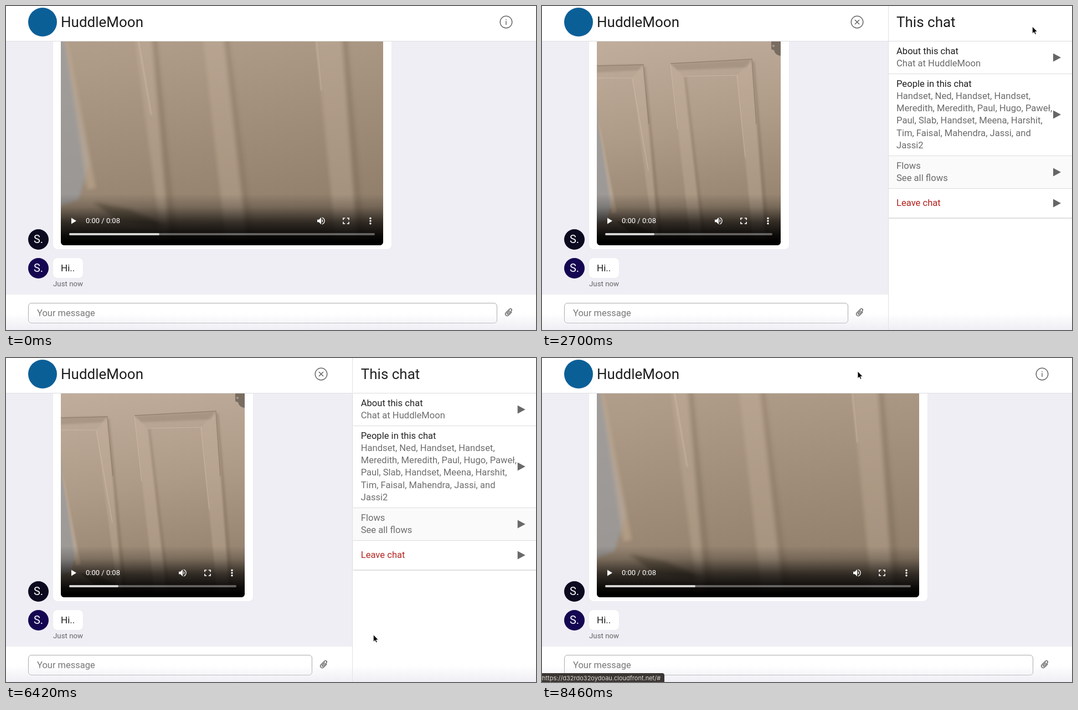
These frames come from a looping animation (957x585 px, 8520 ms). An HTML page:

```html
<!DOCTYPE html>
<html lang="en">
<head>
<meta charset="utf-8">
<title>Chat</title>
<style>
html, body { margin: 0; width: 100%; height: 100%; overflow: hidden; background: #fff; }
body { font: 16.6px/22.2px Roboto, sans-serif; color: #1d1d1d; }
div, svg { position: absolute; top: 0; box-sizing: border-box; white-space: nowrap; }
#stage { left: 0; width: 957px; height: 585px; overflow: hidden; }
#chat { --w: 957px; --video: 582px; --edge: 54px; left: 0; width: var(--w); height: 585px; background: #efeef5; overflow: hidden; }
#chat.narrow { --w: 625px; --video: 331.5px; --edge: 56px; }
.icon { width: 1px; height: 1px; overflow: visible; fill: none; stroke: #555; stroke-width: 1.3; }
.head { left: 0; right: 0; height: 64px; background: #fff; border-bottom: 1px solid #dedee2; }
.title { font-size: 26px; line-height: 30px; top: 14px; }
.logo { left: 40px; top: 3px; width: 52px; height: 52px; border-radius: 50%; background: #0b5f97; }
.bubble { left: 85px; background: #fff; border-radius: 7px; box-shadow: 0 0 1px #0002; }
.avatar { left: 40px; width: 37px; height: 37px; border-radius: 50%; color: #fff; font-size: 20px; line-height: 37px; text-align: center; }
#video { left: 99px; top: 63px; width: var(--video); height: 369px; border-radius: 0 0 6px 6px; overflow: hidden; }
#video .icon { stroke: #fff; fill: #fff; top: 325px; }
#door { left: 0; width: 100%; height: 369px; }
.shade { left: 0; right: 0; top: 277px; height: 92px; background: linear-gradient(#0000, #0003 25%, #000a 55%, #000000ec 82%, #000 95%); }
.track { left: 15px; right: 15px; top: 347px; height: 4px; border-radius: 2px; background: #ffffff59; }
.track div { left: 0; width: 29.6%; height: 4px; border-radius: 2px; background: #ffffffb8; }
.foot { left: 0; right: 0; top: 521px; height: 64px; background: #fff; }
.field { left: 40px; right: calc(var(--edge) + 16px); top: 15px; height: 37px; border: 1px solid #a9a9ad; border-radius: 6px; padding-left: 15px; line-height: 35px; font-size: 16.5px; color: #757575; }
#panel { left: 625px; width: 332px; height: 585px; background: #fff; border-left: 1px solid #e0e0e2; overflow: hidden; }
.page { left: 0; width: 331px; height: 585px; }
.page .title { left: 14px; }
.rows { left: 0; top: 64px; width: 331px; box-shadow: 0 1px 2px #0002; }
.row { position: relative; padding: 6.8px 14px; border-bottom: 1px solid #dcdcdc; }
.row span, .row.off { color: #6b6b6b; }
.row.off { background: #fafafa; }
.row.leave { padding: 15px 14px; color: #b3201b; }
.row .icon { left: 297px; top: 50%; fill: #666; stroke: none; }
.back { left: 29px; top: 550px; color: #666; }
.fade { left: 0; right: 0; top: 555px; height: 30px; background: linear-gradient(#e4e4ee00, #e4e4eea0); }
#status { left: 0; top: 569px; width: 221px; height: 16px; background: #3b3633; border-radius: 0 4px 0 0; color: #dedad6; font: 11px/18px Inter, sans-serif; }
#cursor { left: 0; }
</style>
</head>
<body>
<div id="stage">
  <div id="chat">
    <div class="bubble" style="top:30px;height:409px;width:calc(var(--video) + 29px)"></div>
    <div id="video">
      <svg id="door" viewBox="0 0 331.5 369" preserveAspectRatio="xMidYMax slice">
        <defs>
          <linearGradient id="wall" x2=".15" y2="1">
            <stop stop-color="#c0ad9c"/><stop offset=".5" stop-color="#ae9b87"/><stop offset="1" stop-color="#917f6b"/>
          </linearGradient>
          <filter id="soft" x="-20%" width="140%"><feGaussianBlur stdDeviation="1.8"/></filter>
          <filter id="fine"><feGaussianBlur stdDeviation=".6"/></filter>
        </defs>
        <path fill="url(#wall)" d="M0 0H332V369H0Z"/>
        <g filter="url(#soft)">
          <path fill="#9b9da1" opacity=".75" d="M-3 90L4 159L30 285L18 322L-3 330Z"/>
          <path fill="#c5ad94" opacity=".5" d="M1 140L7 159L36 310L27 312Z"/>
          <path fill="#705f4e" opacity=".28" d="M84 45L88 48L120 369H111ZM280 36L285 38L313 369H304Z"/>
          <path fill="#c8b5a2" opacity=".35" d="M64 67L84 43L112 369H104ZM133 42L157 64L192 369H170ZM253 62L280 34L305 369H283Z"/>
          <path fill="#6f5f4e" opacity=".22" d="M157 64L162 66L199 369H191ZM0 45L84 43L76 53L0 57ZM133 42L280 34L270 48L145 53Z"/>
          <path fill="#413529" opacity=".4" d="M34 325L70 332L110 350L60 345Z"/>
        </g>
        <g fill="none" filter="url(#fine)">
          <path stroke="#dccabb" stroke-width="1.1" opacity=".5" d="M0 67L64 67L93 235M157 64L253 62L268 210M133 42L146 159"/>
          <path stroke="#756553" stroke-width="1.3" opacity=".5" d="M0 45L84 43L94 150M133 41L280 33L288 150"/>
        </g>
        <path fill="#796d61" d="M315 0H332V27Q322 26 320 17L315 15Z"/>
        <circle cx="319" cy="9" r="2" fill="#a79b8d"/>
      </svg>
      <div class="shade"></div>
      <svg class="icon" style="left:19px"><path stroke="none" d="M0-5.5L9 0L0 5.5Z"/></svg>
      <div style="left:45px;top:314px;font-size:13px;color:#fff">0:00 / 0:08</div>
      <svg class="icon" style="right:111px"><path stroke="none" d="M-7-2.3V2.3H-4L0 6.2V-6.2L-4-2.3ZM1.5-3.4Q5 0 1.5 3.4Z"/><path fill="none" d="M1.6-5.8A6 6 0 0 1 1.6 5.8"/></svg>
      <svg class="icon" style="right:66px"><path fill="none" stroke-width="1.7" d="M-5-1.8V-5H-1.8M1.8-5H5V-1.8M5 1.8V5H1.8M-1.8 5H-5V1.8"/></svg>
      <svg class="icon" style="right:22px;stroke:none"><circle cy="-4.8" r="1.7"/><circle r="1.7"/><circle cy="4.8" r="1.7"/></svg>
      <div class="track"><div></div></div>
    </div>
    <div class="avatar" style="top:402.5px;background:#0b0a1f">S.</div>
    <div class="avatar" style="top:454.5px;background:#150651">S.</div>
    <div class="bubble" style="top:455px;width:54px;height:36px;padding-left:14px;line-height:36px;font-size:17px">Hi..</div>
    <div style="left:85px;top:490.5px;font-size:13.3px;color:#666">Just now</div>
    <div class="head">
      <div class="logo"></div>
      <div class="title" style="left:99px">HuddleMoon</div>
      <svg class="icon" style="right:calc(var(--edge) - 1px);top:29px">
        <circle r="10.8"/>
        <path id="info" d="M0-2V5M0-5.2V-3.7"/>
        <path id="close" d="M-4-4L4 4M4-4L-4 4"/>
      </svg>
    </div>
    <div class="foot">
      <div class="field">Your message</div>
      <svg class="icon" style="right:calc(var(--edge) - 6px);top:32px"><path transform="rotate(45)" d="M3.4-4V4.3A3.3 3.3 0 0 1-3.2 4.3V-5A2.3 2.3 0 0 1 1.4-5V3.4A1 1 0 0 1-1 3.4V-3.5"/></svg>
    </div>
  </div>
  <div id="panel">
    <div class="page" id="menu">
      <div class="head"><div class="title">This chat</div></div>
      <div class="rows">
        <div class="row">About this chat<br><span>Chat at HuddleMoon</span></div>
        <div class="row">People in this chat<br><span>Handset, Ned, Handset, Handset,<br>Meredith, Meredith, Paul, Hugo, Paweł,<br>Paul, Slab, Handset, Meena, Harshit,<br>Tim, Faisal, Mahendra, Jassi, and<br>Jassi2</span></div>
        <div class="row off">Flows<br>See all flows</div>
        <div class="row leave">Leave chat</div>
      </div>
    </div>
    <div class="page" id="details">
      <div class="head"><div class="title">Chat info</div></div>
      <div class="rows">
        <div class="row">2<br><span>ID</span></div>
        <div class="row">HuddleMoon<br><span>Company name</span></div>
        <div class="row">2021-06-14T08:55:44.000000Z<br><span>Created at</span></div>
      </div>
      <svg class="icon" style="left:16px;top:562px;stroke-width:1.8"><path d="M4-6.5L-1.5 0L4 6.5"/></svg>
      <div class="back">Back</div>
    </div>
  </div>
  <div class="fade"></div>
  <div id="status">https://d32rdo32oydoau.cloudfront.net/#</div>
  <svg id="cursor" class="icon">
    <path id="arrow" transform="scale(.88)" fill="#000" stroke="#fff" stroke-width="1" d="M0 0V14.8L3.4 11.6L5.6 16.4L8 15.3L5.9 10.7H10.4Z"/>
    <g id="hand" stroke="#111" stroke-width="1.1">
      <path fill="#fff" d="M-1.3 1.3a1.3 1.3 0 0 1 2.6 0V6c0-1.6 2.3-1.6 2.5 0c.3-1.2 2.2-1 2.3.4c.5-.9 1.9-.5 1.9.7V10.5c0 2-1.3 2.5-1.3 5H-.3C-.6 13-5.5 9.8-5.5 8.3c0-1.5 2-1.3 4.2 1.2Z"/>
      <path d="M1 10V13.5M3 10V13.5M5 10V13.5" stroke-width=".8"/>
    </g>
  </svg>
</div>
<script>
const LOOP = 8520;
const $ = id => document.getElementById(id);
const show = (id, on) => $(id).style.display = on ? '' : 'none';

document.querySelectorAll('#menu .row').forEach(row =>
  row.insertAdjacentHTML('beforeend', '<svg class="icon"><path d="M0-7.5L14 0L0 7.5Z"/></svg>'));

// [time, page shown in the side panel]
const pages = [[0, ''], [1968, 'menu'], [3460, 'details'], [6100, 'menu'], [8160, '']];

// [time, x, y] of the pointer tip
const path = [
  [0, 975, 340], [240, 975, 340], [600, 850, 190], [840, 850, 190], [1560, 897, 31.5],
  [2580, 897, 31.5], [3300, 742, 104], [4380, 742, 104], [4980, 803, 260], [5160, 803, 260],
  [5340, 663, 495], [5700, 667, 558], [6240, 667, 558], [6840, 650, 290], [7200, 596, 106],
  [7320, 596, 106], [7800, 570, 24], [LOOP, 570, 24]
];

function pointer(t) {
  const i = path.findIndex(p => p[0] > t);
  const [t0, x0, y0] = path[i - 1], [t1, x1, y1] = path[i];
  const p = (t - t0) / (t1 - t0), k = p * p * (3 - 2 * p);
  return [x0 + (x1 - x0) * k, y0 + (y1 - y0) * k];
}

function isLink(x, y, page) {
  if (Math.hypot(x - (page ? 569 : 903), y - 29) < 12) return true;
  if (!page || x < 626) return false;
  if (page === 'details') return y > 63 && y < 242 || y > 550 && x < 700;
  return y > 63 && y < 383 && !(y > 270 && y < 330);
}

function draw(t) {
  const [since, page] = pages.filter(p => p[0] <= t).pop();
  $('chat').className = page && 'narrow';
  show('panel', page);
  show('info', !page);
  show('close', page);
  for (const id of ['menu', 'details']) show(id, id === page);
  if (page) {
    const k = 1 - (1 - Math.min(1, (t - since) / 400)) ** 2.3;
    $(page).style.opacity = k;
    $(page).style.transform = `translateX(${30 * (1 - k)}px)`;
  }
  show('status', t >= 1740 && t < 2280 || t >= 7740);
  const [x, y] = pointer(t), link = isLink(x, y, page);
  $('cursor').style.transform = `translate(${x}px, ${y}px)`;
  show('hand', link);
  show('arrow', !link);
}

const start = performance.now();
function tick() {
  draw((performance.now() - start) % LOOP);
  requestAnimationFrame(tick);
}
tick();
</script>
</body>
</html>
```
